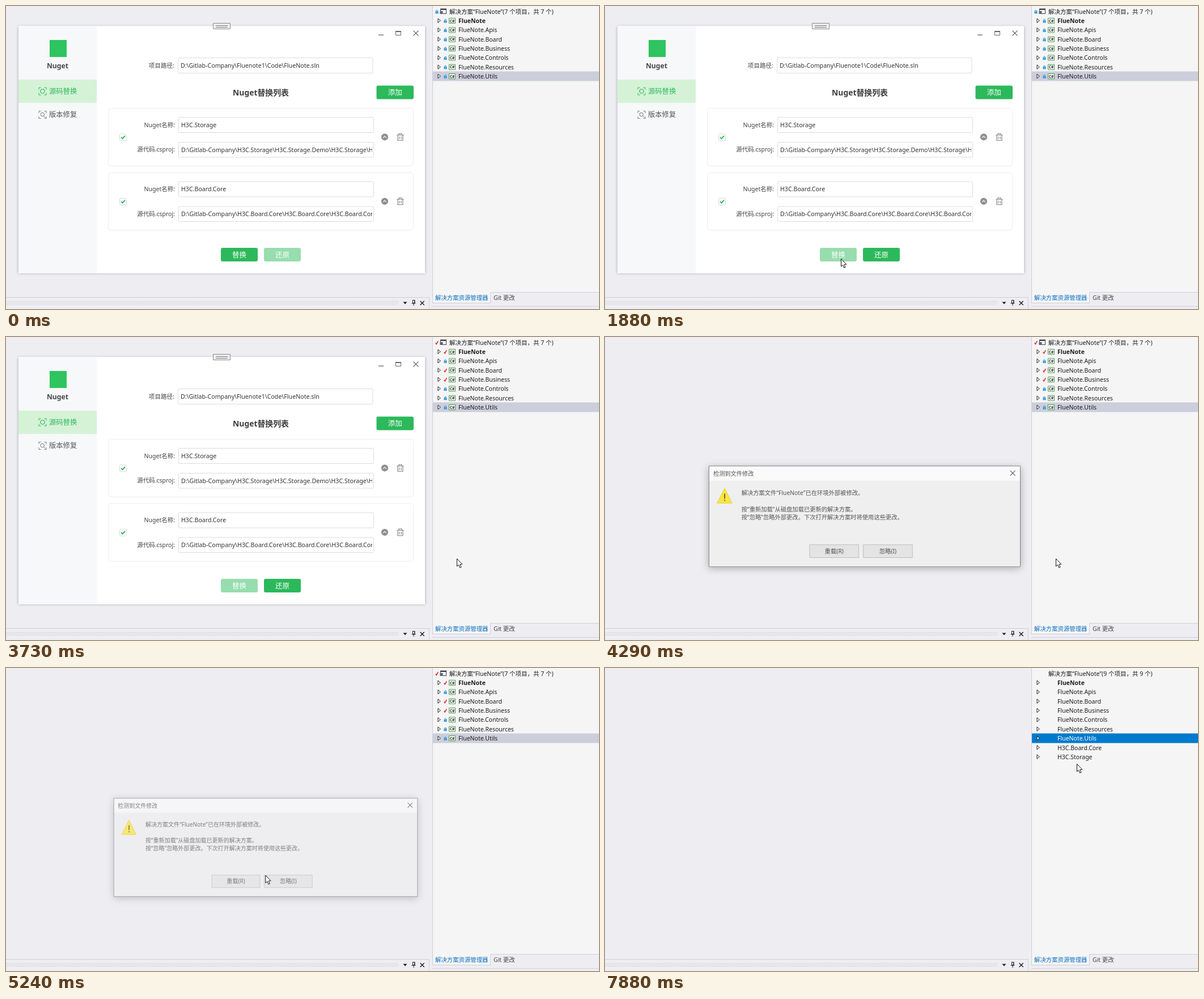
Recreate the animation shown at these times as an HTML page with a canvas. Size 1046 px wide and 535 px high, loop 8000 ms.

```html
<!DOCTYPE html>
<html lang="zh-CN">
<head>
<meta charset="utf-8">
<title>Nuget</title>
<style>
html, body { margin: 0; width: 100%; height: 100%; overflow: hidden; background: #eeeef2; }
canvas { display: block; width: 100vw; height: 100vh; }
</style>
</head>
<body>
<canvas id="stage" width="1046" height="535"></canvas>
<script>
const ctx = document.getElementById('stage').getContext('2d');
const LOOP = 8000;
const FONT = '"Noto Sans", "Noto Sans CJK SC", "Noto Sans CJK", sans-serif';
const GREEN = '#2cb95b', LINE = '#cccedb';

const clamp = v => Math.max(0, Math.min(1, v));
const progress = (t, from, to) => clamp((t - from) / (to - from));
const smooth = k => k * k * (3 - 2 * k);
const easeOut = k => 1 - (1 - k) ** 3;
const inside = (p, x, y, w, h) => p.x >= x && p.x < x + w && p.y >= y && p.y < y + h;

function rect(x, y, w, h, color) {
  ctx.fillStyle = color;
  ctx.fillRect(x, y, w, h);
}

function box(x, y, w, h, r, fill, stroke) {
  ctx.beginPath();
  ctx.roundRect(x, y, w, h, r);
  if (fill) { ctx.fillStyle = fill; ctx.fill(); }
  if (stroke) { ctx.strokeStyle = stroke; ctx.lineWidth = 1; ctx.stroke(); }
}

function poly(points, { fill, stroke, width = 1, close = false } = {}) {
  ctx.beginPath();
  points.forEach(([x, y]) => ctx.lineTo(x, y));
  if (close) ctx.closePath();
  if (fill) { ctx.fillStyle = fill; ctx.fill(); }
  if (stroke) { ctx.strokeStyle = stroke; ctx.lineWidth = width; ctx.stroke(); }
}

function disc(x, y, r, color) {
  ctx.beginPath();
  ctx.arc(x, y, r, 0, 7);
  ctx.fillStyle = color;
  ctx.fill();
}

// y is the visual middle of the line
function text(str, x, y, { size = 10.5, color = '#1e1e1e', weight = 400, align = 'left' } = {}) {
  ctx.font = `${weight} ${size}px ${FONT}`;
  ctx.textAlign = align;
  ctx.fillStyle = color;
  ctx.fillText(str, x, y + size * 0.37);
}

function cross(x, y, r, color, width = 1) {
  poly([[x - r, y - r], [x + r, y + r]], { stroke: color, width });
  poly([[x - r, y + r], [x + r, y - r]], { stroke: color, width });
}

// Paints only outside the rectangle, so translucent windows stay clean
function dropShadow(x, y, w, h, color, blur, dy) {
  ctx.save();
  ctx.beginPath();
  ctx.rect(x - 40, y - 40, w + 80, h + 80);
  ctx.rect(x, y, w, h);
  ctx.clip('evenodd');
  ctx.shadowColor = color;
  ctx.shadowBlur = blur;
  ctx.shadowOffsetY = dy;
  rect(x, y, w, h, '#fff');
  ctx.restore();
}

// ---- IDE frame ----

function drawBackdrop() {
  rect(0, 0, 1046, 535, '#eeeef2');
  rect(0, 514, 747, 1, LINE);
  rect(746, 514, 1, 21, LINE);
  for (let row = 0; row < 3; row++)
    for (let x = row % 2 * 1.5; x < 692; x += 3)
      rect(x, 521 + row * 2.5, 1, 1, '#aeb1bd');
  poly([[700.5, 522.5], [707.5, 522.5], [704, 526.5]], { fill: '#1e1e1e' });
  ctx.strokeStyle = '#1e1e1e';
  ctx.lineWidth = 1;
  ctx.strokeRect(717.5, 519.5, 3, 5);
  rect(720, 519, 1.5, 6, '#1e1e1e');
  rect(715.5, 524.5, 7, 1, '#1e1e1e');
  rect(718.5, 525, 1, 4, '#1e1e1e');
  cross(734.2, 524.5, 3.5, '#1e1e1e', 1.4);

  rect(752, 0, 294, 506, '#f5f5f5');
  rect(752, 0, 1, 524, LINE);
  rect(753, 505, 102, 19, '#f5f5f5');
  rect(854, 505, 1, 19, LINE);
  rect(752, 524, 103, 1, LINE);
  rect(855, 505, 191, 1, LINE);
  rect(752, 530, 294, 1, LINE);
  text('解决方案资源管理器', 757, 515, { size: 10.4, color: '#0e70c0' });
  text('Git 更改', 860, 515, { color: '#444' });
}

function drawStatus(x, y, edited) {
  if (edited) {
    poly([[x - 2.2, y + .5], [x - .8, y + 2.6], [x + 2.3, y - 2.8]], { stroke: '#e0201b', width: 1.5 });
    return;
  }
  rect(x - 2.5, y - .7, 5, 4, '#1c8fe0');
  ctx.beginPath();
  ctx.arc(x, y - 1, 1.5, Math.PI, 0);
  ctx.strokeStyle = '#1c8fe0';
  ctx.lineWidth = 1;
  ctx.stroke();
  rect(x - .5, y + .6, 1, 1.4, '#fff');
}

function drawSolutionIcon() {
  rect(766, 4.5, 11, 9.5, '#424242');
  rect(767, 7, 9, 6, '#f5f5f5');
  rect(765.5, 9, 5, 5, '#5b6275');
}

function drawTree(edited, reloaded) {
  const projects = ['FlueNote', 'FlueNote.Apis', 'FlueNote.Board', 'FlueNote.Business',
    'FlueNote.Controls', 'FlueNote.Resources', 'FlueNote.Utils'];
  if (reloaded) projects.push('H3C.Board.Core', 'H3C.Storage');
  const changed = ['FlueNote', 'FlueNote.Board', 'FlueNote.Business'];
  const n = projects.length;

  rect(753, 115.5, 293, 17, reloaded ? '#007acc' : LINE);
  text(`解决方案“FlueNote”(${n} 个项目，共 ${n} 个)`, 782, 10);
  if (!reloaded) {
    drawStatus(760, 10, edited);
    drawSolutionIcon();
  }
  projects.forEach((name, i) => {
    const y = 26.2 + i * 16.35;
    poly([[762, y - 4], [766.3, y - .3], [762, y + 3.4]],
      { fill: '#fff', stroke: '#1e1e1e', close: true });
    text(name, 798, y, { weight: i ? 400 : 700, color: reloaded && i === 6 ? '#fff' : '#1e1e1e' });
    if (reloaded) return;
    drawStatus(775, y, edited && changed.includes(name));
    box(781.5, y - 4.7, 11, 9, 0, '#f5f5f5', '#4d9a4a');
    text('C#', 787, y - .2, { size: 6.8, weight: 700, color: '#333', align: 'center' });
  });
}

// ---- Tool window ----

function drawBrackets(x, y, color) {
  for (const sx of [-1, 1])
    for (const sy of [-1, 1])
      poly([[x + sx * 3, y + sy * 6.5], [x + sx * 6.5, y + sy * 6.5], [x + sx * 6.5, y + sy * 3]],
        { stroke: color });
}

function drawSidebar() {
  rect(22, 35, 138, 437, '#f7f8fa');
  rect(77, 60, 30, 30, '#2ec45f');
  text('Nuget', 91, 105, { size: 12.2, weight: 600, color: '#4a4a4a', align: 'center' });
  rect(22, 130, 138, 41, '#d5f2d6');
  drawBrackets(64.5, 150.5, GREEN);
  const hexagon = Array.from({ length: 6 }, (_, i) =>
    [64.5 + 4 * Math.cos(i * Math.PI / 3), 150.5 + 4 * Math.sin(i * Math.PI / 3)]);
  poly(hexagon, { stroke: GREEN, width: 1.1, close: true });
  text('源码替换', 76, 150.5, { size: 12.3, color: GREEN });
  drawBrackets(64.5, 192, '#777');
  ctx.beginPath();
  ctx.arc(64.2, 191.5, 3.2, 0, 7);
  ctx.stroke();
  poly([[66.5, 194], [69.5, 197]], { stroke: '#777' });
  text('版本修复', 76, 191.5, { size: 12.3, color: '#555' });
}

function drawInput(x, y, w, h, value) {
  box(x + .5, y + .5, w - 1, h - 1, 2, '#fff', '#dcdcdc');
  ctx.save();
  ctx.beginPath();
  ctx.rect(x + 2, y, w - 5, h);
  ctx.clip();
  text(value, x + 5, y + h / 2, { size: 10.64, color: '#333' });
  ctx.restore();
}

function drawButton(x, y, w, label, fill = GREEN) {
  box(x, y, w, 24, 3, fill);
  text(label, x + w / 2, y + 12.4, { size: 12.5, color: '#fff', align: 'center' });
}

function drawCard(y, name, path) {
  const label = { color: '#444', align: 'right' };
  const mid = y + 51.3;
  box(180.5, y + .5, 538, 102, 5, '#fff', '#ececec');
  text('Nuget名称:', 298, y + 29.7, label);
  drawInput(304, y + 16, 345, 28, name);
  text('源代码.csproj:', 298, y + 73.5, label);
  drawInput(304, y + 60, 345, 27.5, path);

  box(200.5, mid - 5.5, 12, 12, 2, '#fff', '#d9d9d9');
  poly([[203, mid + .3], [205.5, mid + 2.8], [210, mid - 2]], { stroke: GREEN, width: 2 });

  disc(668, mid, 6.1, '#8f8f8f');
  poly([[665.2, mid + 1.3], [668, mid - 1.4], [670.8, mid + 1.3]], { stroke: '#fff', width: 1.2 });

  const gray = { stroke: '#7d7d7d', width: 1.1 };
  poly([[689.5, mid - 3.5], [701.5, mid - 3.5]], gray);
  poly([[693, mid - 4], [693, mid - 6], [698, mid - 6], [698, mid - 4]], gray);
  poly([[691, mid - 3.5], [691, mid + 6], [700, mid + 6], [700, mid - 3.5]], gray);
  for (const x of [693.8, 697.2]) poly([[x, mid - .8], [x, mid + 3.6]], gray);
}

function drawTool(t, pointer) {
  dropShadow(22, 35.5, 717, 436.5, 'rgba(0,0,0,.3)', 5, 0);
  rect(22, 35.5, 717, 436.5, '#fff');
  drawSidebar();

  box(365.5, 30.5, 30, 10, 0, '#efeff1', '#8a8a8a');
  rect(370, 34, 21, 1, '#777');
  rect(370, 37, 21, 1, '#777');
  rect(657, 50.5, 9, 1.3, '#666');
  box(687.5, 44.5, 9, 7, 0, null, '#666');
  rect(687, 44, 10, 2, '#666');
  cross(723, 48, 4.5, '#666', 1.1);

  text('项目路径:', 297, 105, { size: 10.6, color: '#444', align: 'right' });
  drawInput(303, 91, 344.5, 28, 'D:\\Gitlab-Company\\Fluenote1\\Code\\FlueNote.sln');
  text('Nuget替换列表', 449.5, 152.5, { size: 13.9, weight: 600, color: '#3d3d3d', align: 'center' });
  drawButton(653.5, 140.4, 65.5, '添加');

  const root = 'D:\\Gitlab-Company\\';
  drawCard(180, 'H3C.Storage', root + 'H3C.Storage\\H3C.Storage.Demo\\H3C.Storage\\H3C.Storage.csproj');
  drawCard(293.5, 'H3C.Board.Core', root + 'H3C.Board.Core\\H3C.Board.Core\\H3C.Board.Core.csproj');

  const replaced = t >= 1540, disabled = '#97ddae';
  const hover = pointer && inside(pointer, 379, 427, 65, 24);
  drawButton(379, 427, 65, '替换', replaced ? disabled : hover ? '#50c777' : GREEN);
  drawButton(455, 427, 65, '还原', replaced ? GREEN : disabled);
}

// ---- Reload dialog ----

function drawDialogButton(x, label, hot) {
  box(x + .5, 367.5, 88, 23, 0, hot ? '#cce4f7' : '#e1e1e1', hot ? '#1a6fb5' : '#adadad');
  text(label, x + 44.5, 379, { align: 'center' });
}

function drawDialog(t, pointer) {
  const opening = easeOut(progress(t, 4210, 4380));
  const closing = progress(t, 5160, 5330);
  const shown = opening ** 2 * (1 - closing);
  if (!shown) return;
  const scale = .9 + .1 * opening - .08 * closing;

  ctx.save();
  ctx.globalAlpha = shown;
  ctx.translate(458, 317);
  ctx.scale(scale, scale);
  ctx.translate(-458, -317);
  dropShadow(179, 226, 558, 181.5, 'rgba(0,0,0,.4)', 13, 3);
  rect(180, 227, 556, 26, '#fff');
  rect(180, 253, 556, 153.5, '#f0f0f0');
  box(179.5, 226.5, 557, 180.5, 0, null, '#5c5c5c');
  text('检测到文件修改', 187, 240, { size: 10.4 });
  cross(723, 239.3, 4.5, '#222', 1.1);

  poly([[207.5, 266.5], [220.7, 293], [194, 293]],
    { fill: '#ffe100', stroke: '#e9c21a', close: true });
  rect(206.6, 276, 1.8, 9, '#222');
  rect(206.6, 287, 1.8, 2, '#222');

  const line = { size: 10.45 };
  text('解决方案文件“FlueNote”已在环境外部被修改。', 237.5, 275, line);
  text('按“重新加载”从磁盘加载已更新的解决方案。', 237.5, 304, line);
  text('按“忽略”忽略外部更改。下次打开解决方案时将使用这些更改。', 237.5, 318.7, line);
  drawDialogButton(359, '重载(R)', inside(pointer, 359, 367, 89, 24));
  drawDialogButton(455, '忽略(I)', inside(pointer, 455, 367, 89, 24));
  ctx.restore();
}

// ---- Pointer ----

// [start, end, x, y, upward bend]
const START = { x: 523, y: 513 };
const MOVES = [
  [650, 1080, 416, 446, 0],
  [2540, 3320, 737, 390, 20],
  [3390, 3730, 795, 391, 0],
  [4400, 4790, 423, 383, 0],
  [5170, 5570, 835, 174, 0],
  [5570, 5640, 835, 169, 0],
  [6320, 6460, 832, 169, 0],
];

function pointerAt(t) {
  let { x, y } = START;
  for (const [from, to, nx, ny, bend] of MOVES) {
    if (t < from) break;
    const k = smooth(progress(t, from, to));
    x += (nx - x) * k;
    y += (ny - y) * k - bend * Math.sin(Math.PI * k);
  }
  return { x, y };
}

function drawClick(t, from, to, { x, y }) {
  if (t < from || t >= to) return;
  ctx.globalAlpha = .62 * (1 - progress(t, to - 90, to));
  disc(x + .5, y, 10, '#eeee3c');
  ctx.globalAlpha = 1;
}

function drawArrow({ x, y }) {
  const shape = [[.5, .5], [.5, 14], [3.6, 11.2], [5.6, 16.3], [8, 15.3], [5.9, 10.4], [9.8, 10.2]];
  poly(shape.map(([dx, dy]) => [x + dx, y + dy]), { fill: '#fff', stroke: '#111', close: true });
}

function drawBusy({ x, y }, t) {
  const ring = ctx.createConicGradient(t / 1000 * 2 * Math.PI, x, y);
  ring.addColorStop(0, '#1c6fc4');
  ring.addColorStop(.7, '#3fa9ea');
  ring.addColorStop(1, '#b5e4fb');
  ctx.beginPath();
  ctx.arc(x - .5, y - .5, 6.8, 0, 7);
  ctx.strokeStyle = ring;
  ctx.lineWidth = 3;
  ctx.stroke();
}

function drawPointer(t, pointer) {
  drawClick(t, 1340, 1700, pointer);
  drawClick(t, 4950, 5160, pointer);
  if (t >= 6460 && t < 7750) drawBusy(pointer, t);
  else drawArrow(pointer);
}

function render(t) {
  const pointer = t >= 650 ? pointerAt(t) : null;
  drawBackdrop();
  drawTree(t >= 3000, t >= 7750);
  if (t < 4000) drawTool(t, pointer);
  if (pointer) {
    drawDialog(t, pointer);
    drawPointer(t, pointer);
  }
}

function tick() {
  render(performance.now() % LOOP);
  requestAnimationFrame(tick);
}
tick();
</script>
</body>
</html>
```
